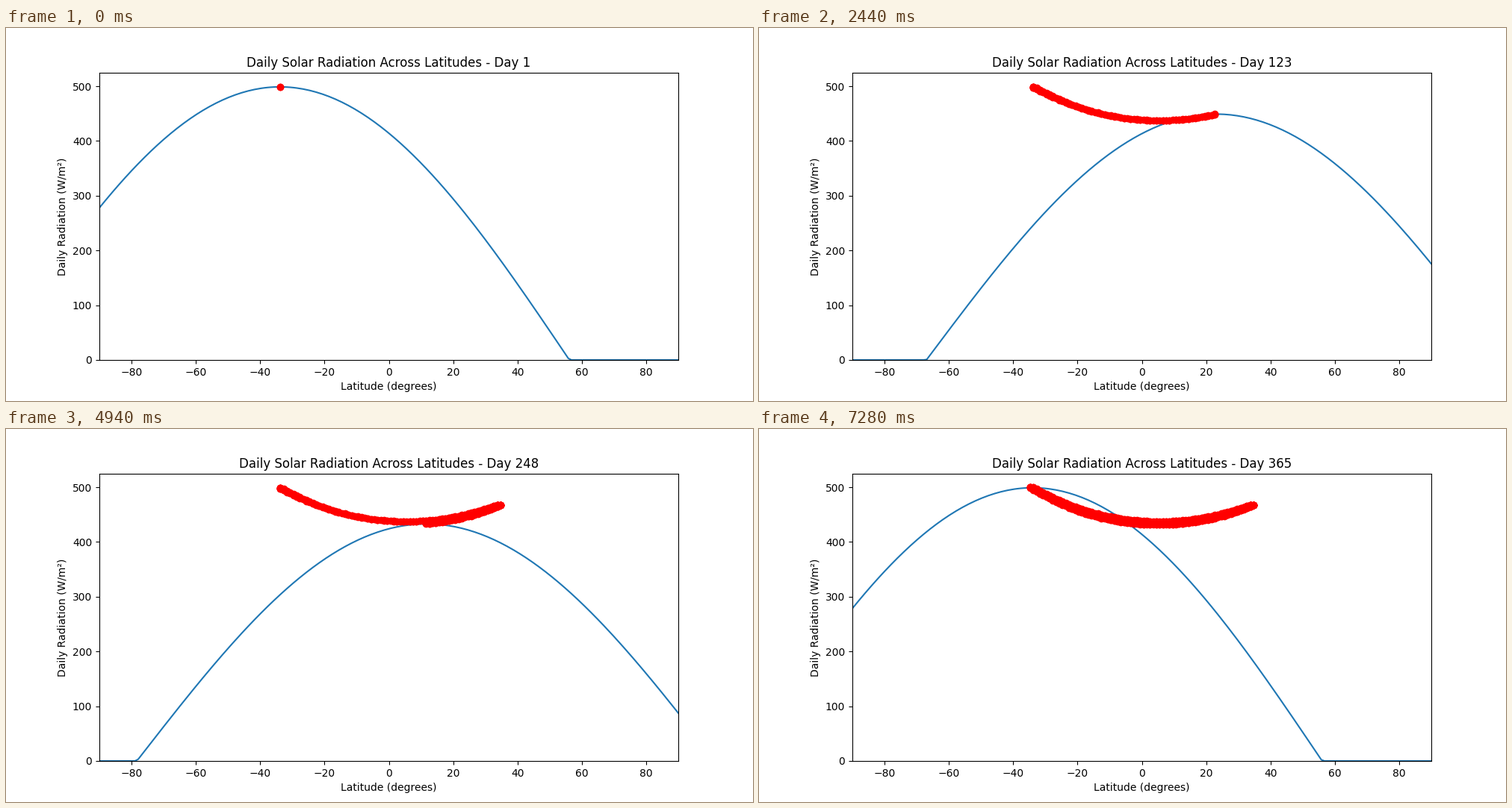
These frames come from a looping animation (1000x500 px, 7.3 s). A matplotlib script:

```python
import numpy as np
import matplotlib.pyplot as plt
from matplotlib.animation import FuncAnimation

DAYS = 365
SOLAR = 1367  # W/m²

lat = np.linspace(-90, 90, 180)
phi = np.radians(lat)


def declination(g):
    return (0.006918 - 0.399912 * np.cos(g) + 0.070257 * np.sin(g)
            - 0.006758 * np.cos(2 * g) + 0.000907 * np.sin(2 * g)
            - 0.002697 * np.cos(3 * g) + 0.00148 * np.sin(3 * g))


def distance_factor(g):
    return (1.00011 + 0.034221 * np.cos(g) + 0.00128 * np.sin(g)
            + 0.000719 * np.cos(2 * g) + 0.000077 * np.sin(2 * g))


def radiation(day):
    g = 2 * np.pi * (day - 1) / DAYS
    dec = declination(g)
    q = SOLAR / np.pi * distance_factor(g) * (
        np.pi / 2 * np.sin(phi) * np.sin(dec) + np.cos(phi) * np.cos(dec))
    return np.maximum(q, 0)


curves = np.array([radiation(d) for d in range(DAYS)])
peak_lat = lat[curves.argmax(axis=1)]
peak_val = curves.max(axis=1)

fig, ax = plt.subplots(figsize=(10, 5), dpi=100)
curve, = ax.plot(lat, curves[0])
trail, = ax.plot([], [], "ro")
ax.set_xlim(-90, 90)
ax.set_ylim(0, 1.05 * curves.max())
ax.set_xlabel("Latitude (degrees)")
ax.set_ylabel("Daily Radiation (W/m²)")
title = ax.set_title("")


def update(i):
    curve.set_ydata(curves[i])
    # the first peak is stamped twice, which hardens its edge
    seen = np.r_[0, 0:i + 1]
    trail.set_data(peak_lat[seen], peak_val[seen])
    title.set_text(f"Daily Solar Radiation Across Latitudes - Day {i + 1}")
    return curve, trail, title


anim = FuncAnimation(fig, update, frames=DAYS, interval=20,
                     repeat=True, repeat_delay=0, blit=False)
plt.show()
```
